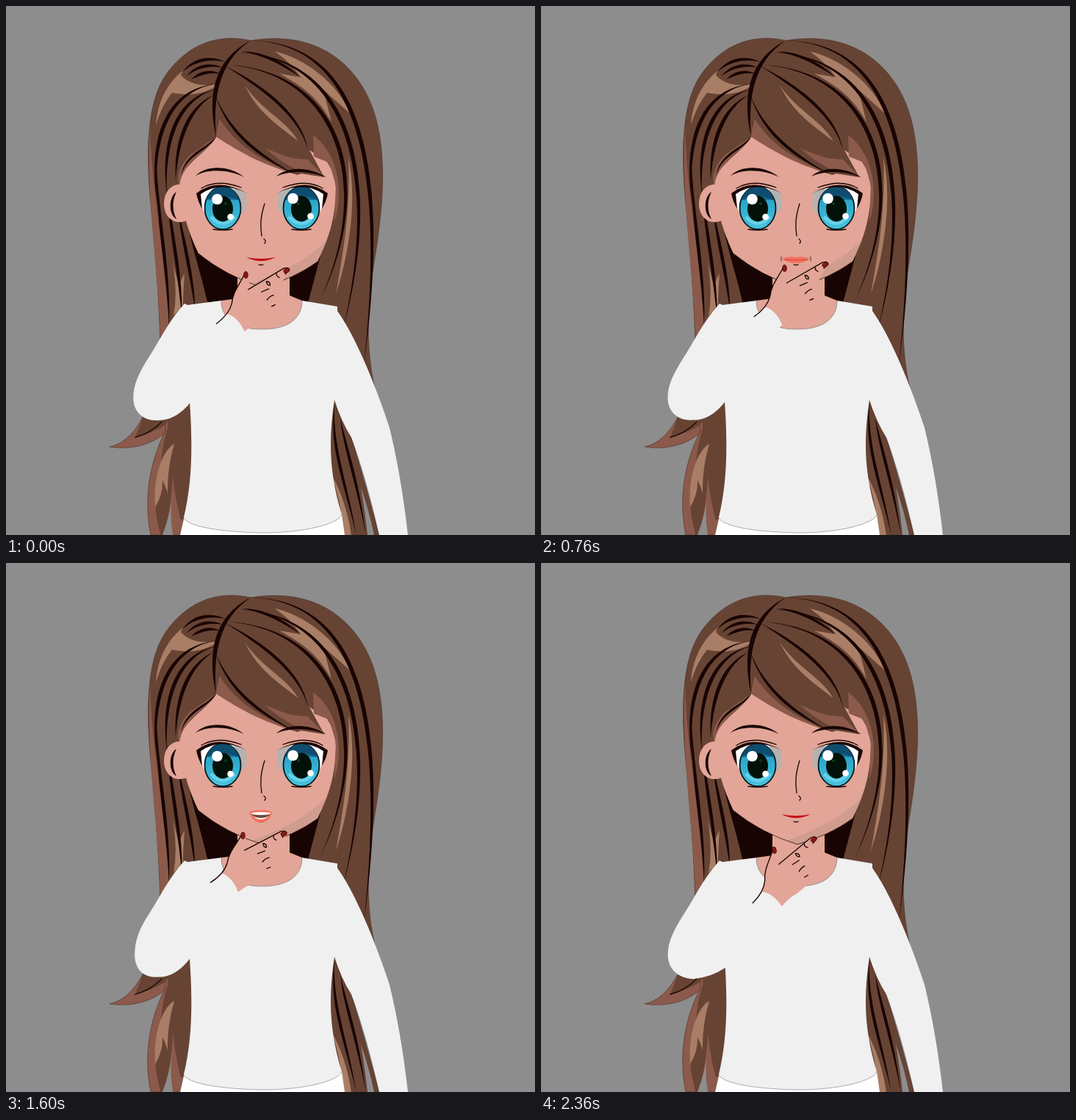
Recreate the animation shown at these times as an HTML page. Size 720 by 720 pixels, loop 3 s.

```html
<!DOCTYPE html>
<html lang="en">
<head>
<meta charset="utf-8">
<title>Thinking girl</title>
<style>
html, body { margin: 0; width: 100%; height: 100%; overflow: hidden; background: #8d8d8d; }
svg { display: block; width: 100vw; height: 100vh; }
.hair { fill: #674334; } .rosy { fill: #8b5a4b; } .shine { fill: #a97e66; }
.dark { fill: #180402; } .skin { fill: #e2a597; } .shade { fill: #cf9c8e; }
.shirt { fill: #f0f0f0; } .lip { fill: #f7705f; } .white { fill: #fff; } .gap { fill: #8d8d8d; }
.line { fill: none; stroke: #180402; stroke-width: 1.3; stroke-linecap: round; }
.thin { stroke-width: .7; }
.nail { fill: #8c1713; stroke: #3a0806; stroke-width: .7; }
.rim { stroke: #4a3028; stroke-width: .6; }
</style>
</head>
<body>
<svg viewBox="0 0 720 720">
  <defs>
    <linearGradient id="iris" x2="0" y2="1">
      <stop offset=".3" stop-color="#156c93"/><stop offset=".32" stop-color="#2aa5c9"/>
      <stop offset="1" stop-color="#48c3de"/>
    </linearGradient>
    <g id="eye">
      <path class="white" d="M262 257Q290 235 326 254Q324 290 304 302H284Q268 285 262 257Z"/>
      <path fill="#b4b3b2" d="M310 248L326 254Q329 268 326 277L318 286Z"/>
      <ellipse cx="295" cy="275" rx="24.5" ry="29" fill="url(#iris)" stroke="#07151b" stroke-width="1.8"/>
      <path fill="#0f4d70" d="M272 264Q280 246 295 246Q312 247 318 265Q296 254 272 264Z"/>
      <path fill="none" stroke="#68d2e8" stroke-width="4" d="M279 287Q294 305 312 287"/>
      <ellipse cx="295" cy="276" rx="14" ry="17.5" fill="#031108"/>
      <circle cx="299" cy="269" r="2" fill="#0b3d18"/>
      <path class="dark" d="M259 255Q288 232 328 255Q292 237 265 256L267 276Q261 266 259 255Z"/>
      <path class="line" d="M266 248Q288 235 320 247M282 304Q295 306 308 304"/>
    </g>
  </defs>

  <g class="rim">
    <path class="hair" d="M333 47C285 36 245 55 218 93C190 133 191 205 197 270C204 340 208 400 210 460L250 560L490 560L502 520C486 450 495 385 504 330C514 265 517 205 504 155C489 95 437 30 333 47Z"/>
    <path class="rosy" d="M187 558C174 583 159 596 141 600C172 605 202 596 220 578L225 555Z"/>
    <path class="rosy" d="M217 578C195 622 187 670 197 720H250V540H215Z"/>
    <path class="hair" d="M440 530L470 586L490 655L508 720H440Z"/>
  </g>
  <path class="hair" d="M187 558L176 587Q200 581 217 570L225 555ZM252 540H220V575C207 615 213 640 206 665C200 687 207 700 210 720H213Q225 690 227 640Q232 680 238 700L256 690Z"/>
  <path class="gap" d="M213 720Q225 690 227 655Q222 690 227 720ZM483 655Q495 690 501 720H492Q489 690 483 655Z"/>
  <path class="shine" d="M229 596C213 605 200 640 203 682Q214 664 213 645Q220 660 220 665Q219 630 229 596ZM443 638Q463 673 470 720H460Q455 670 443 638Z"/>
  <path class="rosy" d="M196 160C197 250 216 330 224 440L210 460C210 380 190 270 196 160Z"/>
  <path class="dark" d="M255 325L320 360V410H276ZM380 360L428 340L411 404H382Z"/>
  <path class="shine" d="M204 162C208 110 240 74 296 66C262 71 240 85 238 94C250 108 270 110 290 106C270 122 245 122 226 118Q212 135 204 162ZM366 62C405 70 452 105 468 146L432 114L443 158C425 125 405 110 372 92L401 97Q388 77 366 62ZM325 108C345 150 377 165 400 188C383 155 350 145 325 108ZM466 206C478 260 468 335 449 392C460 330 469 275 466 206ZM227 350L235 380L243 364Q241 390 241 407L228 422Q234 390 227 350Z"/>
  <path class="line" d="M176 587Q196 582 212 566"/>
  <g id="locks" class="dark"></g>

  <path class="skin" d="M315 360V398L293 401C293 427 314 440 349 440C382 440 403 427 403 401L386 394V360Z"/>
  <path class="skin" d="M236 240C240 215 276 198 286 178L291 155C320 190 355 210 395 227L433 233L413 196L437 212Q449 230 449 250C448 290 440 315 424 347Q390 372 349 382Q300 368 262 337Q249 310 243 285Z"/>
  <path class="rosy" d="M286 178L291 155C315 187 350 206 393 229C345 214 320 200 286 178ZM286 178C278 196 240 210 236 245Q229 225 250 203ZM418 176C445 195 463 240 447 295L449 245Q440 210 437 212L419 205Z"/>
  <path class="hair" d="M290 153C314 190 345 209 396 230L412 225L433 233L411 194L340 140Z"/>
  <path class="rosy" d="M352 193Q375 203 390 207L411 209L434 233Q412 221 398 224Q374 213 352 193Z"/>
  <path class="shade" d="M437 318C412 345 375 363 334 378L349 383Q392 371 424 348Z"/>
  <path class="line thin" d="M262 337Q300 368 349 383Q392 371 424 348"/>
  <g id="fringe" class="dark"></g>
  <path class="skin" d="M248 246C232 237 215 248 215 269C215 291 234 301 251 289Z"/>
  <path class="dark" d="M232 253C221 260 221 284 232 290C226 279 226 265 232 253Z"/>

  <use href="#eye"/>
  <use href="#eye" transform="matrix(-1 0 0 1 697 0)"/>
  <g class="white">
    <circle cx="287.5" cy="263" r="7.3"/><circle cx="305.5" cy="287" r="4.3"/>
    <circle cx="390.5" cy="262" r="7.3"/><circle cx="414.5" cy="286" r="4.3"/>
  </g>
  <path class="line" d="M352 269C346 288 346 300 348 313M351 317Q355 320 352 323M344 352Q347 353 350 352"/>

  <g class="mouth" id="closed">
    <path fill="#c50b10" d="M327 342Q347 346 367 342Q347 352 327 342Z"/>
  </g>
  <g class="mouth" id="pressed">
    <path class="lip" d="M328 344Q337 340 347 342Q357 340 366 344Q358 350 347 350Q336 350 328 344Z"/>
    <path fill="none" stroke="#c9463c" d="M331 345Q347 347 363 345"/>
    <path class="line thin" d="M327 341V347M367 341V347"/>
  </g>
  <g class="mouth" id="wide">
    <path class="lip" d="M325 339Q347 341 369 339C367 352 359 359 347 359C335 359 327 352 325 339Z"/>
    <path fill="#594036" d="M328 341H366Q362 355 347 355Q332 355 328 341Z"/>
    <path class="white" d="M328 340.5Q347 342 366 340.5L365 345Q347 347 329 345ZM334 351Q347 349 360 351Q355 355 347 355Q339 355 334 351Z"/>
    <path class="line thin" d="M325 337Q322 340 325 343M368 337Q371 340 368 343"/>
  </g>
  <g class="mouth" id="small">
    <path class="lip" d="M331 339Q340 335 347 337Q354 335 362 339Q359 353 347 353Q335 353 331 339Z"/>
    <path class="white" d="M334 340Q347 338 360 340Q356 349 347 349Q338 349 334 340Z"/>
    <path fill="#6d4a3d" d="M334 342Q347 344 360 342Q356 347 347 347Q338 347 334 342Z"/>
  </g>

  <path class="white" d="M243 694L237 720H461L457 692Z"/>
  <path class="shirt" d="M247 407L293 401C293 427 314 440 349 440C382 440 403 427 403 401L451 409V415C475 449 500 508 522 574Q538 640 547 720H508Q490 640 470 587Q456 565 447 536C438 595 441 640 457 692C454 705 405 717 350 717C298 716 245 709 242 696C253 650 255 600 249 525Z"/>
  <path class="line thin" style="stroke:#888" d="M242 697C250 710 298 716 350 717C405 717 454 705 457 692M293 401C293 427 314 440 349 440C382 440 403 427 403 401"/>
  <path id="arm" class="shirt"/>

  <!-- The hand is drawn around its thumb tip. -->
  <g id="hand"><g transform="translate(-333 -385)">
    <path class="skin" d="M334 379C328 394 315 406 313 423L305 438L318 462H329Q341 452 352 449L369 440C377 423 374 402 392 384Q395 376 386 377L338 404L337 386Z"/>
    <path class="shirt" d="M291 450L306 437Q321 442 329 462L300 490L265 465Z"/>
    <path class="line" d="M333 381C327 395 315 406 313 423Q309 438 291 450M336 405L385 378Q392 376 393 380L387 386M361 395Q362 401 366 400Q366 395 361 395M375 384Q375 389 379 390M354 409L364 405M361 420Q365 415 370 414M367 429L372 427"/>
    <ellipse class="nail" cx="333.5" cy="385" rx="2.8" ry="4.6"/>
    <ellipse class="nail" cx="389" cy="381" rx="4.2" ry="3" transform="rotate(-25 389 381)"/>
  </g></g>
</svg>
<script>
const byId = id => document.getElementById(id);
const mix = (a, b, u) => a + (b - a) * u;

// Tapered locks of hair, spread evenly between two Bézier curves.
function addLocks(group, width, first, last = first, count = 1) {
  const [from, to] = [first, last].map(curve => curve.split(/[ ,]/).map(Number));
  for (let i = 0; i < count; i++) {
    const [x0, y0, x1, y1, x2, y2, x3, y3] = from.map((v, k) => mix(v, to[k], i / Math.max(1, count - 1)));
    const bulge = width * 0.67 / Math.hypot(x3 - x0, y3 - y0);
    const nx = (y0 - y3) * bulge, ny = (x3 - x0) * bulge;
    byId(group).innerHTML += `<path d="M${x0} ${y0}C${x1 + nx} ${y1 + ny} ${x2 + nx} ${y2 + ny} ${x3} ${y3}` +
      `C${x2 - nx} ${y2 - ny} ${x1 - nx} ${y1 - ny} ${x0} ${y0}"/>`;
  }
}
addLocks("locks", 5.5, "333,47 500,50 515,260 487,490", "302,80 450,90 505,235 427,402", 3);
addLocks("locks", 4, "299,76 278,69 255,72 239,91", "291,92 278,87 262,92 252,100", 3);
addLocks("locks", 5, "288,106 213,113 195,195 207,275", "283,121 245,140 231,190 231,238", 3);
addLocks("locks", 4.5, "205,220 206,290 222,360 222,440", "248,300 258,335 270,370 275,404", 4);
addLocks("locks", 4, "447,540 442,600 460,640 477,720", "455,560 461,600 477,640 490,720", 2);
addLocks("locks", 4, "320,62 350,63 380,80 401,97");
addLocks("fringe", 6, "333,47 285,75 278,125 286,178");
addLocks("fringe", 3, "287,176 276,196 244,200 238,232");
addLocks("fringe", 4, "299,82 340,105 401,145 411,196", "285,122 305,175 345,204 393,229", 2);
addLocks("fringe", 4, "257,232 273,218 305,220 324,233", "368,232 382,222 410,220 436,233", 2);

const poses = [
  { at: 0, x: 326, y: 366, tilt: -2 },
  { at: 320, x: 333, y: 385, tilt: 0 },
  { at: 760, x: 331, y: 357, tilt: -1 },
  { at: 1120, x: 326, y: 374, tilt: -1 },
  { at: 1400, x: 321, y: 364, tilt: 3 },
  { at: 1800, x: 323, y: 378, tilt: 0 },
  { at: 2360, x: 317, y: 391, tilt: -11 }
];
const speech = [[0, "closed"], [600, "pressed"], [920, "wide"], [1600, "small"], [2120, "closed"]];
const mouths = document.querySelectorAll(".mouth");

function poseAt(t) {
  const next = Math.max(1, poses.findIndex(p => p.at >= t));
  const a = poses[next - 1], b = poses[next];
  const u = (t - a.at) / (b.at - a.at), eased = u * u * (3 - 2 * u);
  return ["x", "y", "tilt"].map(key => mix(a[key], b[key], eased));
}

function draw(elapsed) {
  const t = Math.min(2360, Math.floor(elapsed % 3000 / 40) * 40);
  const [x, y, tilt] = poseAt(t);
  byId("hand").setAttribute("transform", `translate(${x} ${y}) rotate(${tilt})`);

  // The sleeve follows the wrist, 77 units below the thumb tip.
  const turn = tilt * Math.PI / 180;
  const wristX = x - 4 - 77 * Math.sin(turn), wristY = y + 77 * Math.cos(turn);
  const fold = 540 + (wristY - 442) * 0.4 + (wristX - 326) * 0.5;
  const elbow = 173 + (326 - wristX) * 0.22;
  byId("arm").setAttribute("d", `M247 407L243 405C220 430 208 458 190 485` +
    `C180 502 ${elbow} 516 ${elbow} 533C${elbow} 552 186 565 207 ${564 + (fold - 540) * 0.2}` +
    `Q231 564 251 ${fold}L${wristX - 8} ${wristY + 8}L280 440Z`);

  const shape = speech.findLast(([at]) => at <= t)[1];
  mouths.forEach(mouth => mouth.style.display = mouth.id === shape ? "" : "none");
}

const start = performance.now();
function tick() {
  draw(performance.now() - start);
  requestAnimationFrame(tick);
}
tick();
</script>
</body>
</html>
```
